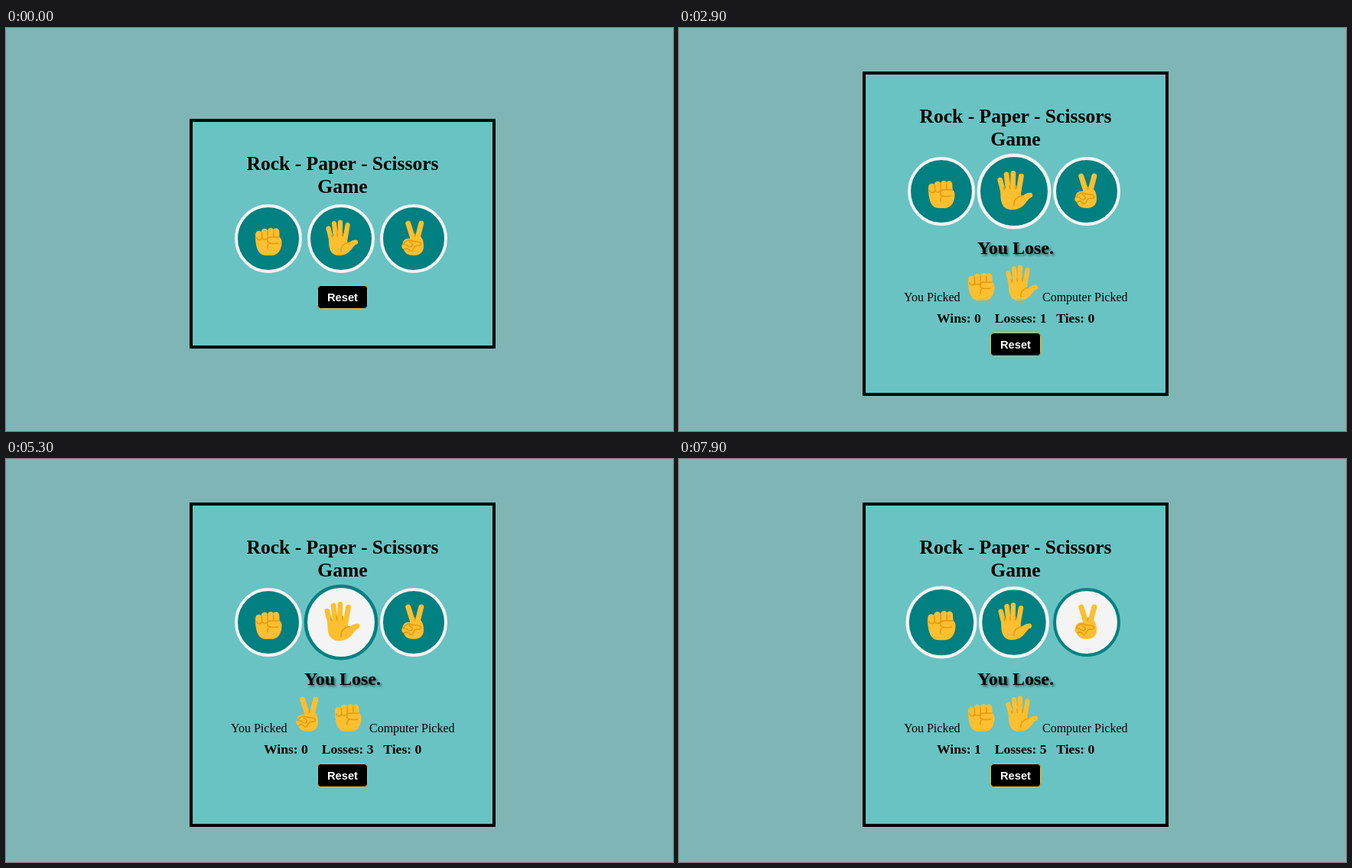
An HTML page that plays this animation: 872 px wide and 528 px high, repeating every 8000 ms.

```html
<!DOCTYPE html>
<html lang="en">
<head>
<meta charset="utf-8">
<title>Rock - Paper - Scissors</title>
<style>
html, body { margin: 0; width: 872px; height: 528px; overflow: hidden; background: #7fb5b5; }
svg { display: block; }
text { font-family: "Liberation Serif", "Times New Roman", serif; font-size: 16px; }
.mid { text-anchor: middle; }
.title { font-size: 25.6px; font-weight: bold; }
.verdict { font-size: 24px; font-weight: bold; filter: drop-shadow(2px 2px 1.5px rgba(0, 0, 0, .5)); }
.score { font-size: 17.6px; font-weight: bold; }
.reset { font: bold 14.7px "Liberation Sans", Arial, sans-serif; fill: #fff; }
.choice ellipse { fill: #008080; stroke: #f4f4f4; stroke-width: 4; }
.choice.lit ellipse { fill: #f4f4f4; stroke: #008080; }
.skin { fill: #fbbf30; stroke: none; }
.finger { fill: none; stroke: #fbbf30; stroke-linecap: round; }
.crease { fill: none; stroke: #e49a10; stroke-width: 1.5; stroke-linecap: round; stroke-linejoin: round; }
</style>
</head>
<body>
<svg width="872" height="528" viewBox="0 0 872 528">
  <defs>
    <g id="rock">
      <path class="finger" stroke-width="8.6" d="M-12.6 -6L-12 5M-5 -9L-4.5 4M3.2 -9.8V4M10 -9.4L10.5 2"/>
      <path class="skin" d="M-17 -5C-16.5 5 -16.5 22 -3 22H4C13 22 17.5 14 17.5 4C17.5 0 15 -3 11 -3Z"/>
      <path class="crease" d="M-8.7 -8L-8.3 -1M-.9 -10V-2M6.8 -9.5V-3M-15.5 -1C-14 2.5 -9 2.5 -8.3 -1C-7 2 -2.5 2 -1.2 -1M14 -2H3C-2 -2 -3 5 2 6C6 7 10 6 13 6M2 6C-1 8 -1.8 10 -1 13"/>
    </g>
    <g id="paper">
      <path class="finger" stroke-width="6.2" d="M-16.5 -13.5L-12 4M-9 -20L-6.5 2M-1 -21.5L-1.5 2M8.6 -18L4.8 4M19 4.6C14 5 11 9 8 14"/>
      <path class="skin" d="M-16.5 -6L-10 -3H7.5L8.5 6C11 5 13 3 16 2L20 7C14 11 12 22 -3 22C-12 22 -16 15 -16 5Z"/>
      <path class="crease" d="M10 5C4 6 -1 10 0 17M-12.2 -5L-11.5 -2M-5.2 -7L-4.7 -3M2 -7V-3"/>
    </g>
    <g id="scissors">
      <path class="finger" stroke-width="7" d="M-7.2 -20L0 3M9.8 -20L4 3"/>
      <path class="skin" d="M-3 -3L8 -4C12 0 13 4 13 10C13 18 8 22 0 22C-7 22 -12 19 -13 14C-16 13 -16.5 9 -14.5 7C-14.5 2 -10 -1 -5 0Z"/>
      <path class="crease" d="M-13.5 6.5C-10 3 -7 1 -4 2.5C0 5 6 2.5 9.5 6C10.5 9 7 9.5 4 9C1 9 0 12 -1 14M-14 7.5C-11 7 -9 8 -7 10C-4 12 -1 10 -2 7L-6 4M-12.5 14C-9 12 -7 12.5 -5.5 15C-4 17 -1 16 -1 14M1.2 -3L2 -6"/>
    </g>
  </defs>
  <rect id="panel" x="242" width="396" fill="#69c3c3" stroke="#000" stroke-width="4"/>
  <g id="top">
    <text class="title mid" x="440" y="124">Rock - Paper - Scissors</text>
    <text class="title mid" x="440" y="154">Game</text>
  </g>
  <g id="result">
    <text class="verdict mid" id="verdict" x="440" y="296"></text>
    <text x="294" y="358">You Picked</text>
    <use id="mine" x="395" y="335"/>
    <use id="theirs" x="447" y="335"/>
    <text x="475" y="358">Computer Picked</text>
    <text class="score" id="wins" x="337" y="386"></text>
    <text class="score" id="losses" x="412.7" y="386"></text>
    <text class="score" x="493.3" y="386">Ties: 0</text>
  </g>
  <g id="reset">
    <rect x="407.5" y="399.5" width="65" height="30" rx="4" stroke="#d5c04c"/>
    <text class="reset mid" x="440" y="420">Reset</text>
  </g>
</svg>
<script>
const LOOP = 8000, TICK = 100, FADE = 300;
const names = ['rock', 'paper', 'scissors'];

// [time, hovered button or -1]
const hovers = [[70, 1], [130, -1], [700, 0], [1010, -1], [1700, 1], [3800, 2],
  [5040, 1], [6900, 0], [7820, 1], [7900, 2]];
// [mouse down, mouse up]
const presses = [[2900, 3100], [4400, 4600], [5500, 5700], [6300, 6500], [7300, 7500]];
// [time, player, computer, wins, losses]
const rounds = [[1300, 0, 1, 0, 1], [3100, 1, 2, 0, 2], [4600, 2, 0, 0, 3],
  [5700, 1, 0, 1, 3], [6500, 1, 2, 1, 4], [7500, 0, 1, 1, 5]];

const $ = id => document.getElementById(id);
const lastBefore = (rows, t) => rows.filter(row => row[0] <= t).pop();

const buttons = names.map(name => {
  const g = document.createElementNS('http://www.w3.org/2000/svg', 'g');
  g.setAttribute('class', 'choice');
  g.innerHTML = `<ellipse rx="42" ry="43"/><use href="#${name}"/>`;
  $('top').append(g);
  return g;
});

// CSS "ease": cubic-bezier(.25, .1, .25, 1)
function ease(x) {
  if (x <= 0) return 0;
  if (x >= 1) return 1;
  const curve = (u, a, b) => 3 * a * u * (1 - u) ** 2 + 3 * b * u * u * (1 - u) + u ** 3;
  let lo = 0, hi = 1;
  for (let i = 0; i < 20; i++) {
    const mid = (lo + hi) / 2;
    if (curve(mid, .25, .25) < x) lo = mid; else hi = mid;
  }
  return curve(lo, .1, 1);
}

// Growth of one button, 0 to 1; a reversed transition starts from where it is
function growth(i, t) {
  let from = 0, to = 0, start = 0, span = 1;
  const at = time => from + (to - from) * ease((time - start) / span);
  for (const [time, target] of hovers) {
    if (time > t) break;
    const next = target === i ? 1 : 0;
    if (next === to) continue;
    from = at(time);
    to = next;
    start = time;
    span = FADE * Math.abs(to - from) || 1;
  }
  return at(t);
}

// The picture advances in ticks, with two longer holds near the start
function snap(t) {
  if (t >= 1000 && t < 1300) return 1000;
  if (t >= 300 && t < 1000) return 300;
  return Math.floor(t / TICK) * TICK;
}

function draw(t) {
  const round = lastBefore(rounds, t);
  const hover = (lastBefore(hovers, t) || [0, -1])[1];
  const pressed = presses.some(([down, up]) => t >= down && t < up);
  const shift = round ? 0 : 62;

  $('panel').setAttribute('y', 59 + shift);
  $('panel').setAttribute('height', 421 - 2 * shift);
  $('top').setAttribute('transform', `translate(0 ${shift})`);
  $('reset').setAttribute('transform', `translate(0 ${-shift})`);
  buttons.forEach((g, i) => {
    g.setAttribute('transform', `translate(${343 + 95 * i} 214) scale(${1 + .1 * growth(i, t)})`);
    g.classList.toggle('lit', i === hover && !pressed);
  });

  $('result').style.display = round ? '' : 'none';
  if (!round) return;
  const [, mine, theirs, wins, losses] = round;
  $('mine').setAttribute('href', '#' + names[mine]);
  $('theirs').setAttribute('href', '#' + names[theirs]);
  $('verdict').textContent = (mine - theirs + 3) % 3 === 1 ? 'You Win.' : 'You Lose.';
  $('wins').textContent = 'Wins: ' + wins;
  $('losses').textContent = 'Losses: ' + losses;
}

const begin = performance.now();
function frame() {
  draw(snap((performance.now() - begin) % LOOP));
  requestAnimationFrame(frame);
}
frame();
</script>
</body>
</html>
```
